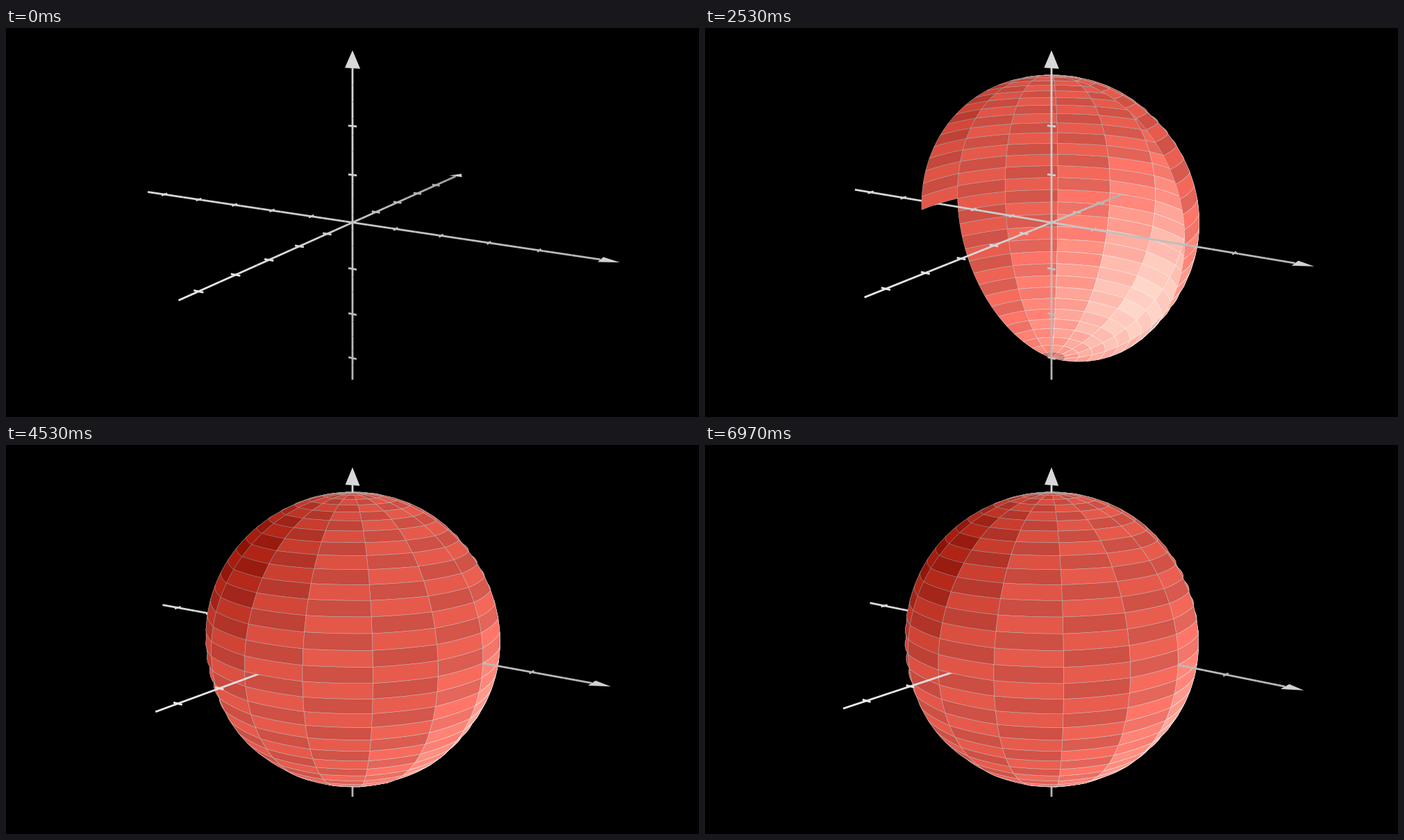
Write a matplotlib script that moves like this. It is 998 by 561 pixels and loops after 7.01 s.

```python
import numpy as np
import matplotlib.pyplot as plt
from matplotlib.animation import FuncAnimation
from matplotlib.collections import PolyCollection

W, H, DPI = 998, 561, 100
LOOP_MS, FRAMES, FPS = 7010, 210, 30
UNIT = H / 8                      # pixels per scene unit
FOCAL = 20
PHI, THETA, SPIN = np.radians(75), np.radians(-60), 0.02
BUILD = 150                       # frames spent building the sphere
LIGHT = np.array([-7.0, -9.0, 10.0])
EX, EY, EZ = np.eye(3)

RADIUS, N_LON, N_LAT = 3, 15, 32
REDS = np.array([[230, 90, 76], [207, 80, 68]]) / 255
GREY = np.full(3, 187 / 255)
LINE_PX, GRID_PX = 2.8, 0.5
STEPS = 4                         # samples per curved edge


def unit(v):
    return v / np.linalg.norm(v)


def shade(rgb, point, normal):
    f = 0.5 * np.dot(normal, unit(LIGHT - point)) ** 3
    return np.clip(rgb + (f if f > 0 else f / 2), 0, 1)


def smooth(t, k=10):
    sig = lambda x: 1 / (1 + np.exp(-x))
    low = sig(-k / 2)
    return np.clip((sig(k * (t - 0.5)) - low) / (1 - 2 * low), 0, 1)


def on_sphere(lon, polar):
    return RADIUS * np.array([np.cos(lon) * np.sin(polar),
                              np.sin(lon) * np.sin(polar),
                              np.cos(polar)])


polys, centers, fills, edges, widths = [], [], [], [], []


def add(pts, fill, edge, width, corners=None):
    pts = np.asarray(pts, float)
    box = pts if corners is None else np.asarray(corners)
    polys.append(pts)
    centers.append((box.min(axis=0) + box.max(axis=0)) / 2)
    fills.append((*fill, 1) if fill is not None else (0, 0, 0, 0))
    edges.append((*edge, 1))
    widths.append(width * 72 / DPI)


def add_axis(d, side, half, lit, tip_normal, pieces=20, tip=0.35):
    def tone(s, normal=EY):
        glow = 0.2 * (lit * s + half) / (2 * half)
        return shade(GREY + glow, s * d, normal)

    base = half - tip
    stops = np.linspace(-half, base, pieces + 1)
    for a, b in zip(stops[:-1], stops[1:]):
        add([a * d, b * d], None, tone((a + b) / 2), LINE_PX)
    for s in range(-int(half), int(half)):
        if s:
            add([s * d - 0.1 * side, s * d + 0.1 * side], None, tone(s), LINE_PX)
    w = tip / 2 * side
    color = tone(base, tip_normal)
    add([half * d, base * d + w, base * d - w, half * d], color, color, 0)


def add_face(i, j):
    du, dv = 2 * np.pi / N_LON, np.pi / N_LAT
    ring = [(i, j), (i + 1, j), (i + 1, j + 1), (i, j + 1), (i, j)]
    ring = np.array(ring) * (du, dv)
    t = np.linspace(0, 1, STEPS + 1)[:, None]
    bez = np.hstack([(1 - t) ** 3, 3 * t * (1 - t) ** 2, 3 * t * t * (1 - t), t ** 3])
    pts = []
    for a, b in zip(ring[:-1], ring[1:]):
        ctrl = np.array([on_sphere(*(a + (b - a) * q / 3)) for q in range(4)])
        pts.extend((bez @ ctrl)[:-1])
    pts.append(on_sphere(*ring[0]))
    c = np.array([on_sphere(*r) for r in ring[:-1]])

    def normal(k):
        n = np.cross(c[(k + 1) % 4] - c[k], c[k - 1] - c[k])
        return unit(n) if np.linalg.norm(n) > 1e-9 else EY

    def mean_tone(rgb):
        return (shade(rgb, c[0], normal(0)) + shade(rgb, c[2], normal(2))) / 2

    add(pts, mean_tone(REDS[(i + j) % 2]), mean_tone(GREY), GRID_PX, c)


add_axis(EX, EY, 5.5, -1, EZ)
add_axis(EY, EX, 5.5, -1, EZ)
add_axis(EZ, EX, 3.5, 1, EY)
n_axis = len(polys)
n_faces = N_LON * N_LAT
for i in range(N_LON):
    for j in range(N_LAT):
        add_face(i, j)

points = np.concatenate(polys)
ends = np.cumsum([len(p) for p in polys])
starts = ends - [len(p) for p in polys]
centers, fills, edges, widths = map(np.array, (centers, fills, edges, widths))


def camera(theta):
    a = -theta - np.pi / 2
    c, s = np.cos(a), np.sin(a)
    turn = np.array([[c, -s, 0], [s, c, 0], [0, 0, 1]])
    c, s = np.cos(PHI), np.sin(PHI)
    tilt = np.array([[1, 0, 0], [0, c, s], [0, -s, c]])
    return tilt @ turn


def project(pts, rot):
    x, y, z = (pts @ rot.T).T
    k = UNIT * FOCAL / (FOCAL - z)
    return np.column_stack([W / 2 + x * k, H / 2 - y * k])


def partial(pts, frac):
    pos = frac * (len(pts) - 1)
    k = int(pos)
    last = pts[k] + (pts[min(k + 1, len(pts) - 1)] - pts[k]) * (pos - k)
    return np.vstack([pts[:k + 1], last])


fig = plt.figure(figsize=(W / DPI, H / DPI), dpi=DPI, facecolor="black")
ax = fig.add_axes([0, 0, 1, 1])
ax.set(xlim=(0, W), ylim=(H, 0))
ax.axis("off")
scene = PolyCollection([], closed=False)
scene.set_snap(False)
ax.add_collection(scene, autolim=False)


def draw(n):
    rot = camera(THETA + SPIN * n / FPS)
    flat = project(points, rot)
    built = n_faces * smooth(min(n / BUILD, 1))
    count = n_axis + int(np.ceil(built - 1e-9))
    verts = [flat[a:b] for a, b in zip(starts[:count], ends[:count])]
    if built % 1 > 1e-6 and count > n_axis:
        verts[-1] = partial(verts[-1], built % 1)
    order = np.argsort(centers[:count] @ rot[2], kind="stable")
    scene.set_verts([verts[k] for k in order], closed=False)
    scene.set_facecolor(fills[order])
    scene.set_edgecolor(edges[order])
    scene.set_linewidth(widths[order])
    return scene,


anim = FuncAnimation(fig, draw, frames=FRAMES, interval=LOOP_MS / FRAMES,
                     repeat=True, repeat_delay=0, blit=False)
plt.show()
```
